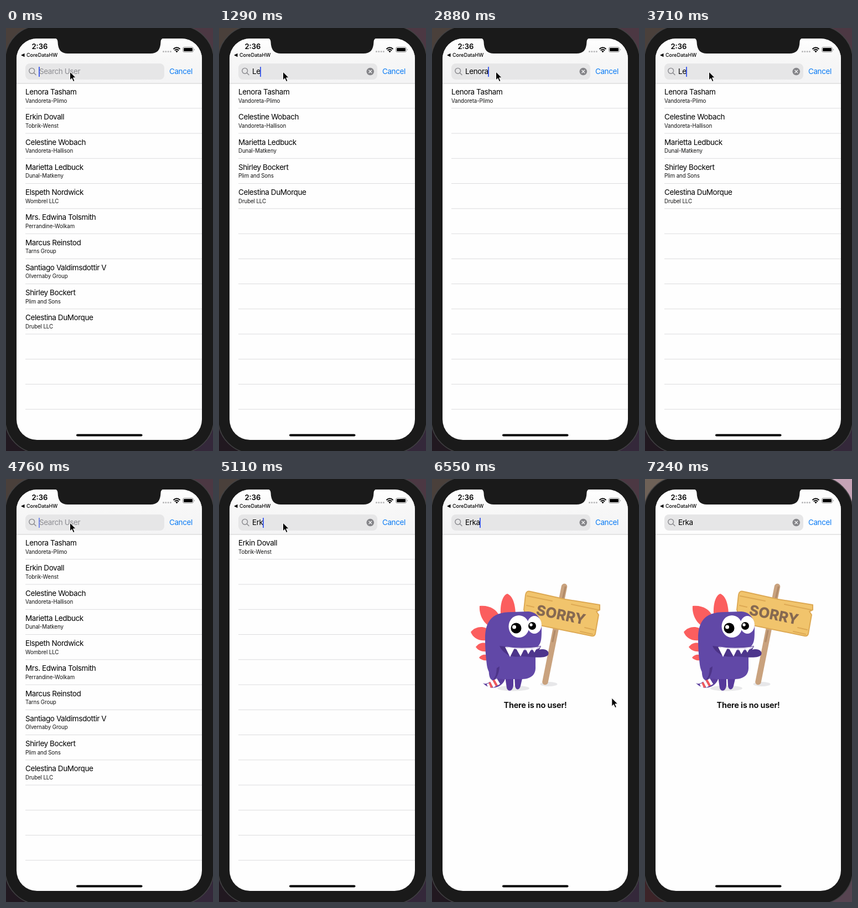
These frames come from a looping animation (374 px wide and 763 px high, 7340 ms). An HTML page:

```html
<!DOCTYPE html>
<html lang="en">
<head>
<meta charset="utf-8">
<title>User search</title>
<style>
html, body { margin: 0; width: 100%; height: 100%; overflow: hidden; background: #1a1a1a; }
#stage { position: absolute; left: 0; top: 0; width: 374px; height: 763px; overflow: hidden; font-family: Inter, "Liberation Sans", sans-serif; }
svg { position: absolute; left: 0; top: 0; display: block; }
text { font-family: Inter, "Liberation Sans", sans-serif; }
.title { font-size: 13.5px; letter-spacing: -.42px; }
.sub { font-size: 9.7px; letter-spacing: -.08px; fill: #111; }
#field { position: absolute; left: 60px; top: 64px; height: 29px; line-height: 29px; white-space: nowrap; font-size: 13.5px; letter-spacing: -.42px; color: #000; }
#field.empty #typed { color: #8d8d92; }
#caret { position: absolute; top: 6px; width: 2px; height: 18px; background: #4763ea; }
#bar { fill: url(#barTint); }
.tl { fill: #4a403b; } .tr { fill: #4c3843; } .bl { fill: #211820; } .br { fill: #34283a; }
.last #bar { fill: #fdfdfd; }
.last .tl { fill: #6e6157; } .last .tr { fill: #c5a3b6; } .last .bl { fill: #3c2428; } .last .br { fill: #574451; }
</style>
</head>
<body>
<div id="stage">
<svg width="374" height="763" viewBox="0 0 374 763">
  <defs>
    <linearGradient id="barTint" x1="0" y1="0" x2="0" y2="1">
      <stop offset="0" stop-color="#fff"/><stop offset=".45" stop-color="#f7f7f7"/><stop offset="1" stop-color="#f4f4f5"/>
    </linearGradient>
    <clipPath id="screen"><rect x="19" y="19" width="335" height="724" rx="37"/></clipPath>
  </defs>
  <rect class="tl" width="187" height="382"/>
  <rect class="tr" x="187" width="187" height="382"/>
  <rect class="bl" y="382" width="187" height="381"/>
  <rect class="br" x="187" y="382" width="187" height="381"/>
  <rect x="-1.5" y="-4" width="377" height="771" rx="62" fill="#1a1a1a" stroke="#414143" stroke-width="1.5"/>

  <g clip-path="url(#screen)">
    <rect x="19" y="19" width="335" height="724" fill="#fefefe"/>
    <rect id="bar" x="19" y="19" width="335" height="81"/>
    <path d="M19 100H354" stroke="#cfcfd0" stroke-width="1.2"/>
    <g id="list"></g>
    <g id="sorry">
      <ellipse cx="147" cy="377.5" rx="29" ry="5" fill="#e7e7e9"/>
      <ellipse cx="211" cy="370" rx="15.5" ry="4" fill="#e7e7e9"/>
      <path d="M239 194L204.500 366" stroke="#c9a27e" stroke-width="10.500" stroke-linecap="round"/>
      <path d="M241 195L236 217M222 274L218 293" stroke="#b18a68" stroke-width="3" stroke-linecap="round"/>
      <path d="M169 209Q170 201 178 203L241 217L303 227V236L297 239L301 245L295 279Q294 284 288 283L166 258L163 249L169 243L166 236Z" fill="#f1c46c" stroke="#dda954" stroke-width="2" stroke-linejoin="round"/>
      <path d="M172 211L217 220M252 226L300 236M171 228L184 231M268 275L290 280M276 268L293 272" fill="none" stroke="#dda954" stroke-width="2" stroke-linecap="round"/>
      <text transform="translate(233 245) rotate(11.500)" y="9" text-anchor="middle" font-size="26" font-weight="800" fill="#866951">SORRY</text>
      <g fill="#fb5e5e">
        <path d="M124 243C123 222 129 209 136 207C146 211 150 225 151 243Z"/>
        <path d="M86 229C104 227 117 236 121 246L104 266C91 258 85 243 86 229Z"/>
        <path d="M70 276C80 264 97 265 104 274L98 291C84 293 74 286 70 276Z"/>
        <path d="M79 303C85 295 93 294 100 297V311C90 312 83 309 79 303Z"/>
        <path d="M85 322C90 316 96 316 101 318V327C94 328 88 326 85 322Z"/>
      </g>
      <path d="M92 368C102 373 106 361 119 358L132 361C128 375 106 384 92 368Z" fill="#5b3f9d"/>
      <path d="M101 369L104 376M107 364L113 375M115 361L121 371" stroke="#fff" stroke-width="5"/>
      <path d="M104 367L108 376M111 362L117 373" stroke="#f05a5c" stroke-width="4"/>
      <path d="M132 356H147V372C146 384 137 384 135 377ZM149 356H164L160 373C158 382 151 381 150 373Z" fill="#57399b"/>
      <path d="M96 290C95 252 113 240 144 240L174 239C191 240 199 254 198 272C198 292 197 299 187 305V338C188 354 178 361 160 361H131C109 361 101 350 99 335C97 318 96 305 96 290Z" fill="#6148a7"/>
      <path d="M105 326C102 344 101 359 109 363C117 362 120 351 122 339Z" fill="#6148a7"/>
      <path d="M122 338C121 352 116 362 109 363C116 357 116 350 117 341Z" fill="#4d3488"/>
      <path d="M122 301Q158 307 197 301C195 308 190 312 183 314C167 321 145 324 134 315Q125 309 122 301Z" fill="#4b3286"/>
      <path d="M145 312C163 308 183 309 199 307C209 307 212 313 210 317C205 325 181 321 151 319Z" fill="#4d358c"/>
      <path d="M132 302Q160 307 196 302Q194 307 186 308Q158 311 132 302Z" fill="#d9d1ec"/>
      <path d="M132 303L141 321L149 305ZM152 306L160 320L167 306ZM169 306L174 316L180 306ZM181 306L185 313L190 304Z" fill="#fff"/>
      <ellipse cx="157" cy="266" rx="18.500" ry="20" fill="#fff"/>
      <ellipse cx="185" cy="263" rx="13" ry="16" fill="#fff"/>
      <circle cx="152" cy="269" r="9.500"/><circle cx="181" cy="265" r="7"/>
      <circle cx="148.500" cy="267" r="3.500" fill="#fff"/><circle cx="179" cy="263" r="2.700" fill="#fff"/>
      <text x="186.500" y="413" text-anchor="middle" font-size="14.600" font-weight="600" letter-spacing="-.25">There is no user!</text>
    </g>
  </g>

  <path d="M87 18C92 19 93 21 93.500 25C94 40 100 46 112 46H261C273 46 279 40 279.500 25C280 21 281 19 286 18Z" fill="#1a1a1a"/>
  <text x="46.500" y="38" font-size="13" font-weight="600">2:36</text>
  <path d="M27 49L33.500 45.800V52.200Z"/>
  <text x="37" y="52.200" font-size="9" font-weight="500">CoreDataHW</text>
  <path d="M284.500 42.500H298" stroke="#b5b5b7" stroke-width="3" stroke-linecap="round" stroke-dasharray="0 4.300"/>
  <g fill="none" stroke="#000" stroke-width="2">
    <path d="M302.500 38Q308.500 32.500 314.500 38M304.800 40.500Q308.500 37 312.200 40.500"/>
  </g>
  <path d="M306.300 42Q308.500 40.200 310.700 42L308.500 44.300Z"/>
  <rect x="319.500" y="34.500" width="19" height="9" rx="2.700" fill="none" stroke="#8f8f8f"/>
  <rect x="321" y="36" width="16" height="6" rx="1.300"/>
  <path d="M340 37.500Q342 39 340 40.500Z" fill="#8f8f8f"/>

  <rect x="35" y="64" width="251" height="29" rx="8" fill="#e6e6e7"/>
  <g fill="none" stroke="#87878c" stroke-width="1.400" stroke-linecap="round"><circle cx="46.700" cy="77.300" r="4.900"/><path d="M50.400 81L54 84.600"/></g>
  <g id="clear"><circle cx="273.300" cy="78.500" r="6.800" fill="#858589"/><path d="M270.900 76.100L275.700 80.900M275.700 76.100L270.900 80.900" stroke="#fff" stroke-width="1.300" stroke-linecap="round"/></g>
  <text class="title" x="295" y="83" fill="#0a7bf5">Cancel</text>
  <rect x="127" y="732.500" width="119.500" height="4" rx="2"/>
</svg>

<div id="field"><span id="typed"></span><i id="caret"></i></div>

<svg width="374" height="763" viewBox="0 0 374 763">
  <path id="mouse" d="M0 0V15L3.400 11.800L6 17.600L8.500 16.500L6 10.800H10.800Z" stroke="#fff" stroke-width="1"/>
</svg>
</div>

<script>
const LOOP = 7340, ROW = 45.25;
const $ = id => document.getElementById(id);

const users = [
  ['Lenora Tasham', 'Vandoreta-Plimo'],
  ['Erkin Dovall', 'Tobrik-Wenst'],
  ['Celestine Wobach', 'Vandoreta-Hallison'],
  ['Marietta Ledbuck', 'Dunal-Matkeny'],
  ['Elspeth Nordwick', 'Wombrel LLC'],
  ['Mrs. Edwina Tolsmith', 'Perrandine-Wolkam'],
  ['Marcus Reinstod', 'Tarns Group'],
  ['Santiago Valdimsdottir V', 'Olvernaby Group'],
  ['Shirley Bockert', 'Plim and Sons'],
  ['Celestina DuMorque', 'Drubel LLC']
];

const typing = [
  [0, ''], [990, 'L'], [1290, 'Le'], [1500, 'Len'], [1680, 'Leno'], [1820, 'Lenor'],
  [1940, 'Lenora'], [2180, 'Lenoraa'], [2880, 'Lenora'], [3030, 'Lenor'], [3380, 'Leno'],
  [3500, 'Len'], [3710, 'Le'], [3830, 'L'], [3950, ''], [4810, 'E'], [4870, 'Er'],
  [5110, 'Erk'], [5590, 'Erka']
];

// [time, opacity]
const blink = [
  [0, 1], [405, 1], [500, 0], [750, 0], [850, 1], [2705, 1], [2840, 0], [2879, 0], [2880, 1],
  [4740, 1], [4809, 0], [4810, 1], [6115, 1], [6240, 0], [6425, 0], [6540, 1], [6980, 1], [7090, 0], [LOOP, 0]
];

// [time, x, y]
const path = [[0, 115.5, 79], [6425, 115.5, 79], [6580, 346, 427], [6745, 346, 427], [6980, 392, 500], [LOOP, 392, 500]];

const smooth = u => u * u * (3 - 2 * u);

function sample(keys, t, col, ease = u => u) {
  const i = Math.max(1, keys.findIndex(k => k[0] > t));
  const a = keys[i - 1], b = keys[i];
  return a[col] + (b[col] - a[col]) * ease((t - a[0]) / (b[0] - a[0]));
}

function label(cls, y, text) {
  return `<text class="${cls}" x="35" y="${y}">${text}</text>`;
}

let shown = null;
function search(query) {
  if (query === shown) return;
  shown = query;
  const found = users.filter(u => u[0].toLowerCase().includes(query.toLowerCase()));
  let out = '';
  for (let i = 0; i < 13; i++) {
    const y = i * ROW;
    out += `<path d="M35 ${y + 144.8}H354" stroke="#dcdcde"/>`;
    if (found[i]) out += label('title', y + 120, found[i][0]) + label('sub', y + 134.5, found[i][1]);
  }
  $('list').innerHTML = out;
  $('list').style.display = found.length ? '' : 'none';
  $('sorry').style.display = found.length ? 'none' : '';
  $('clear').style.display = query ? '' : 'none';
  $('field').className = query ? '' : 'empty';
  $('typed').textContent = query || 'Search User';
}

function draw() {
  const t = performance.now() % LOOP;
  search(typing.filter(k => k[0] <= t).pop()[1]);
  const caret = $('caret').style;
  caret.left = (shown ? $('typed').getBoundingClientRect().width - 1 : -1) + 'px';
  caret.opacity = sample(blink, t, 1);
  $('mouse').setAttribute('transform', `translate(${sample(path, t, 1, smooth)} ${sample(path, t, 2, smooth)})`);
  $('stage').className = t >= 7240 ? 'last' : '';
  requestAnimationFrame(draw);
}
draw();
</script>
</body>
</html>
```
